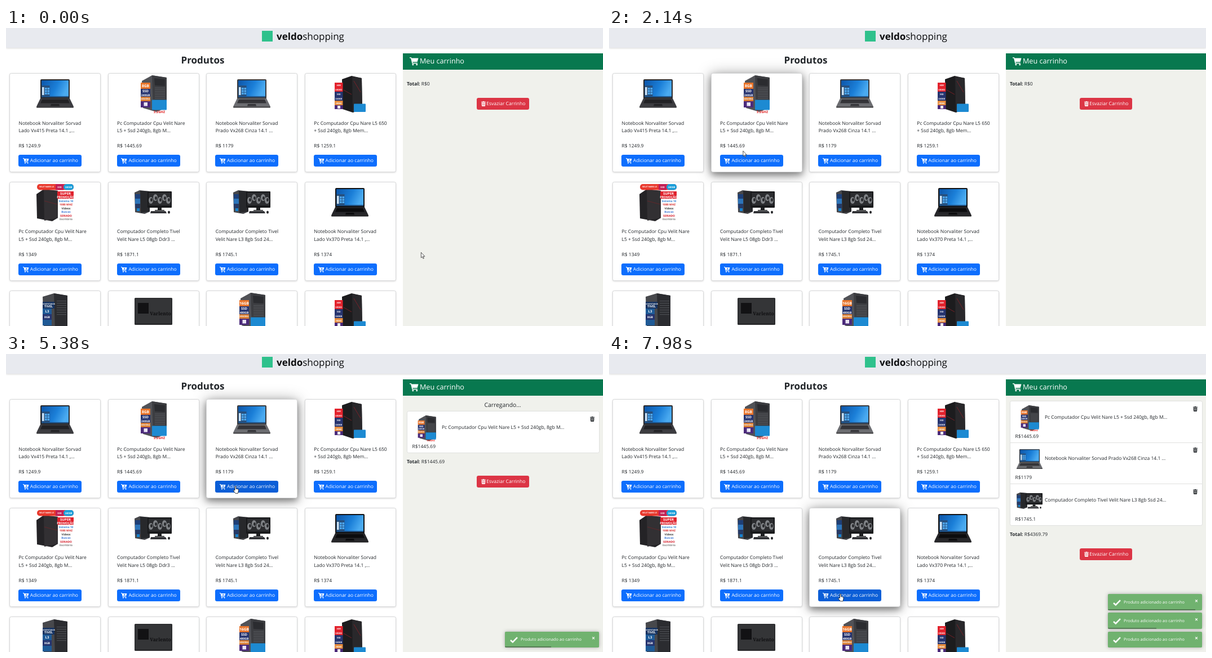
An HTML page for the animation above (8000 ms loop, 1059x529 px).

```html
<!DOCTYPE html>
<html lang="pt-BR">
<head>
<meta charset="utf-8">
<title>Loja</title>
<style>
html, body { margin: 0; width: 100%; height: 100%; overflow: hidden; background: #fff; }
#stage { position: relative; width: 1059px; height: 529px; overflow: hidden; background: #fff;
  font: 8.5px/14px "Open Sans", "Noto Sans", sans-serif; color: #212529; text-rendering: geometricPrecision; }
#stage div, #stage span, #stage svg { position: absolute; box-sizing: border-box; white-space: pre; }
#stage svg { overflow: visible; }
.top { left: 0; top: 0; width: 1059px; height: 35px; background: #e8eaef; box-shadow: 0 1px 3px rgba(0,0,0,.16); }
.card { width: 162px; height: 176px; background: #fff; border: 1px solid #d6d7d8; border-radius: 3.4px;
  box-shadow: 0 1px 3px rgba(0,0,0,.14); z-index: 1; }
.card.on { z-index: 0; box-shadow: 0 2px 26px rgba(0,0,0,.36), 0 5px 12px rgba(0,0,0,.36); }
.btn { background: #0d6efd; border-radius: 3.3px; color: #fff; }
.btn.on { background: #0b5ed7; }
.panel { left: 704px; top: 45px; width: 355px; height: 484px; background: #f0f1ec; z-index: 2; }
.head { left: 704px; top: 45px; width: 355px; height: 29px; background: #08784f; color: #fff; z-index: 2; }
.cart { left: 0; top: 0; z-index: 3; }
.item { left: 711px; width: 341.5px; height: 74.3px; background: #fff; border: 1px solid #dfe0de; }
.toast { left: 885px; width: 167px; height: 28.6px; background: #51a351; border-radius: 1.7px; color: #fff;
  box-shadow: 0 0 6.6px #999; overflow: hidden; z-index: 4; }
.bar { left: 0; bottom: 0; height: 2.2px; background: #000; opacity: .4; }
.cursor { left: 0; top: 0; z-index: 9; }
</style>
</head>
<body>
<div id="stage"></div>
<script>
const stage = document.getElementById('stage');

function add(parent, cls, css = '', html = '') {
  const el = document.createElement('div');
  el.className = cls;
  el.style.cssText = css;
  el.innerHTML = html;
  parent.append(el);
  return el;
}
// One line of text, centred vertically on y
const line = (x, y, str, css = '') => `<span style="left:${x}px;top:${y - 7}px;${css}">${str}</span>`;
const svg = (x, y, w, h, box, body) =>
  `<svg style="left:${x}px;top:${y}px" width="${w}" height="${h}" viewBox="0 0 ${box}">${body}</svg>`;
const rect = (x, y, w, h, fill, r = 0) => `<rect x="${x}" y="${y}" width="${w}" height="${h}" rx="${r}" fill="${fill}"/>`;
const poly = (points, fill) => `<polygon points="${points}" fill="${fill}"/>`;
const label = (x, y, size, fill, str, more = '') =>
  `<text x="${x}" y="${y}" font-size="${size}" font-weight="700" text-anchor="middle" fill="${fill}" ${more}>${str}</text>`;

// Icons
const cartShape = '<path d="M0 0h2.4l.5 1.3H13l-1.6 5.6H4.4l.3 1.3h6.9v1.2H3.7L1.7 1.3H0z"/><circle cx="4.9" cy="10.9" r="1.2"/><circle cx="10.7" cy="10.9" r="1.2"/>';
const cartIcon = (x, y, w, plus) => svg(x, y, w, w * 12 / 13, '13 12',
  `<g fill="#fff">${cartShape}</g>` + (plus ? '<path d="M7.8 2.2v3.8M5.9 4.1h3.8" stroke="#0d6efd" stroke-width="1"/>' : ''));
const trashIcon = (x, y, fill, gap) => svg(x, y, 8, 9, '8 9',
  `<g fill="${fill}"><path d="M0 .7h2.4L2.9 0h2.2l.5.7H8v1.1H0z"/><path d="M.6 2.4h6.8L7 8.2q-.1.8-.9.8H1.9Q1.1 9 1 8.2z"/></g>
   <path d="M2.5 3.6v4M4 3.6v4M5.5 3.6v4" stroke="${gap}" stroke-width=".6"/>`);

// Product pictures on a 66 by 66 field
function laptop(lid, base, keys) {
  const tiles = [0, 1, 2, 3, 4, 5].map(i => rect(15 + i % 2 * 4.5, 22 + (i >> 1) * 4.3, 3.6, 3.4, '#4fa9f0')).join('');
  return rect(7, 7, 52, 35, lid, 2) + rect(9, 9, 48, 29.5, 'url(#screen)') + rect(9, 18, 14.5, 19, '#27517f') + tiles +
    rect(10, 21, 3.6, 14, '#c9dff2') + rect(9, 37, 48, 1.5, '#1c4f86') +
    poly('7,41 59,41 66,55.5 0,55.5', base) + poly('10,42.8 56,42.8 59,49.5 7,49.5', keys) +
    poly('26,51 40,51 41,54.4 25,54.4', keys) + rect(0, 55.2, 66, 2.3, lid, 1);
}
function tower(mem, disk) {
  return poly('13,10 31,0 57,4 57,57 39,65 15,58', '#515257') + poly('31,0 57,4 57,57 33,62', '#3c3d41') +
    poly('35,5 54,7 54,19 36,18', '#2b2c30') +
    [22, 25, 28, 31, 34, 37, 40].map(y => rect(36, y, 18, 1, '#55575c')).join('') +
    rect(11, 13, 17, 11, '#e8742a') + label(19.5, 20.5, 6.6, '#fff', mem) + rect(11, 24, 17, 14, '#26346f') +
    label(19.5, 30, 6, '#fff', 'SSD') + label(19.5, 36.5, 5, '#fff', disk) + rect(11, 38, 17, 8, '#d97f35') +
    label(19.5, 43.4, 3.3, '#fff', 'MEMÓRIA') + rect(11, 46, 17, 11, '#4b2a7b') + rect(16.5, 48, 6.5, 6.5, '#e9e4f4') +
    rect(31, 43.5, 26, 18, '#1d8ad2', 1) + label(44, 66.5, 5.8, '#e02020', '3.2GHZ');
}
const blackTower = () => poly('19,7 36,1 54,5 55,60 38,66 20,60', '#1c1c1e') + poly('37,2 54,5 55,60 38,66', '#29282b') +
  '<path d="M22 26 36 34M40 10 52 30" stroke="#8d2028" stroke-width=".8"/>' +
  ['#e3222c', '#e3222c', '#26346f', '#26346f', '#e58b3c'].map((c, i) =>
    rect(6, 13 + i * 8, 14.5, 8, c) + label(13.2, 18.5 + i * 8, 3.8, '#fff', ['4GB', 'VIDEO', 'SSD', '240GB', 'HDMI'][i])).join('') +
  rect(6, 53, 14.5, 7, '#4b2a7b') + rect(11, 54, 5, 5, '#eee') + rect(40, 50.5, 21, 14.5, '#1d8ad2', 1);
function promoTower() {
  const rows = [['#2a7fd4', 'Sistema 10'], ['#d52a2a', '1000 MHZ'], ['#333', 'Videos'], ['#3c78d8', 'Buscas'], ['#d31420', 'SERIADO'], ['#777', 'Escritório']];
  return poly('0,18 13,9 38,12 38,60 28,66 1,61', '#242326') + poly('13,10 38,12 38,60 14,65', '#323033') +
    '<path d="M14 30 37 36" stroke="#6d2529" stroke-width=".8"/>' +
    rect(1, 0, 65, 10.5, '#e93a2e', 5) + rect(34, 0, 14, 10.5, '#c32055') + rect(48, 0, 18, 10.5, '#1c9fda', 5) +
    label(18, 6.3, 3.7, '#fff', 'VELIT NARE L5') + label(41, 6.5, 4, '#fff', 'SSD') + label(57, 6.5, 4, '#fff', '240GB') +
    rect(37, 13, 29, 13, '#e0232e') + label(51.5, 18.7, 6, '#fff', 'SUPER') + label(51.5, 25, 5.2, '#fff', 'PROMOÇÃO') +
    rows.map(([c, s], i) => label(52.5, 32 + i * 6.4, 4.8, c, s)).join('');
}
const fullSet = () => poly('0,15 9,11 27,13 27,49 18,53 1,50', '#46474b') + poly('10,12 27,13 27,49 11,51', '#27282b') +
  rect(1, 18, 9, 8, '#1e3f77') + rect(1, 26, 9, 9, '#2c74b9') + rect(1, 35, 9, 8, '#253a66') + rect(4, 43, 5, 5, '#1680cc') +
  rect(23, 13, 43, 29, '#18191b', 1) + rect(25, 15, 39, 23, '#2b2c2f') +
  [29, 37, 45, 53, 60].map((x, i) =>
    `<ellipse cx="${x}" cy="${i % 2 ? 24 : 29}" rx="4" ry="6" fill="#a4a7ab" opacity=".7"/><ellipse cx="${x + 1}" cy="${i % 2 ? 25 : 28}" rx="2" ry="3" fill="#2b2c2f"/>`).join('') +
  rect(41, 42, 7, 5, '#1f2022') + rect(36, 46, 17, 1.5, '#1f2022') + poly('29,48 55,48 57,52 28,52', '#323337') +
  '<ellipse cx="61" cy="50" rx="2" ry="2.5" fill="#25262a"/>';
const darkTower = () => poly('11,7 31,1 55,5 55,60 36,66 13,60', '#47484c') + poly('31,1 55,5 55,60 33,66', '#2b2c30') +
  [14, 18, 22, 26, 30, 34, 38].map(y => rect(36, y, 17, 1.2, '#4b4d52')).join('') +
  rect(11, 16, 21, 12, '#173462') + label(21.5, 20.5, 3.2, '#fff', 'COMPUTADOR') + label(21.5, 26.4, 5.6, '#fff', 'TIVEL') +
  rect(11, 28, 16, 10, '#1f5a96') + label(19, 35, 6, '#fff', 'L3') + rect(11, 38, 16, 10, '#26346f') +
  label(19, 45, 5, '#fff', '8GB') + rect(11, 48, 16, 10, '#1f5a96');
const disk = () => rect(0, 9, 67, 48, '#2d2e30', 1.5) + rect(2, 11, 63, 44, '#343537') + rect(6, 18, 19, 19, '#121214') +
  label(46, 40, 8.6, '#101012', 'Varlento', 'font-family="Noto Serif, serif"') +
  rect(2, 55, 63, 1, '#1d1d1f');

const art = {
  a: laptop('#29292c', '#3c3c40', '#222225'), b: tower('8GB', '240GB'), c: laptop('#3a3a3d', '#6c6d71', '#343438'),
  d: blackTower(), e: promoTower(), f: fullSet(), g: laptop('#111113', '#262629', '#0c0c0e'),
  h: darkTower(), i: disk(), j: tower('16GB', '480GB')
};
const picture = (key, x, y, size) => svg(x, y, size, size, '66 66', art[key]);

const products = [
  ['a', 'Notebook Norvaliter Sorvad', 'Lado Vx415 Preta 14.1 ,...', '1249.9'],
  ['b', 'Pc Computador Cpu Velit Nare', 'L5 + Ssd 240gb, 8gb M...', '1445.69'],
  ['c', 'Notebook Norvaliter Sorvad', 'Prado Vx268 Cinza 14.1 ...', '1179'],
  ['d', 'Pc Computador Cpu Nare L5 650', '+ Ssd 240gb, 8gb Mem...', '1259.1'],
  ['e', 'Pc Computador Cpu Velit Nare', 'L5 + Ssd 240gb, 8gb M...', '1349'],
  ['f', 'Computador Completo Tivel', 'Velit Nare L5 08gb Ddr3 ...', '1871.1'],
  ['f', 'Computador Completo Tivel', 'Velit Nare L3 8gb Ssd 24...', '1745.1'],
  ['g', 'Notebook Norvaliter Sorvad', 'Lado Vx370 Preta 14.1 ,...', '1374'],
  ['h'], ['i'], ['j'], ['d']
];
const chosen = [1, 2, 6];

stage.innerHTML = '<svg width="0" height="0"><linearGradient id="screen" x2="1" y2=".3"><stop stop-color="#0d55a8"/><stop offset=".6" stop-color="#1b7fd8"/><stop offset="1" stop-color="#4aaaf0"/></linearGradient></svg>';
add(stage, 'top', '', `<div style="left:454px;top:5px;width:19px;height:19px;background:#2fc18c"></div>` +
  line(480, 15, '<b>veldo</b>shopping', 'font-size:17px;color:#0c0d0f'));
add(stage, '', 'left:0;top:0', line(310.5, 57, 'Produtos', 'font-size:17px;font-weight:700'));

const cards = products.map(([key, first, second, price], i) => {
  const x = 6 + i % 4 * 174.6, y = 80.3 + (i >> 2) * 192.8;
  const el = add(stage, 'card', `left:${x}px;top:${y}px`, picture(key, 46.5, 2.8, 66) +
    (first ? line(15.5, 88.4, first) + line(15.5, 102, second) + line(15.5, 128.6, 'R$ ' + price) : ''));
  const btn = add(el, 'btn', 'left:15.3px;top:144px;width:112px;height:21.2px',
    cartIcon(7.5, 5.8, 10.4, true) + line(20.5, 10.8, 'Adicionar ao carrinho'));
  return { el, btn, x, y };
});

add(stage, 'panel');
add(stage, 'head', '', cartIcon(11.5, 6.5, 15.5) + line(30, 14, 'Meu carrinho', 'font-size:12.6px'));
const cart = add(stage, 'cart');
const loading = add(cart, '', 'left:704px;top:84px;width:354px;text-align:center;font-size:10.4px', 'Carregando...');
const items = chosen.map((n, i) => {
  const [key, first, second, price] = products[n];
  return add(cart, 'item', '', picture(key, 11, 6.5, 46) + line(61, 28.7, first + ' ' + second) +
    line(8.5, 62.3, 'R$' + price) + trashIcon(323.5, 8.5, '#212529', '#fff'));
});
const total = add(cart, '', 'left:711px');
const clear = add(cart, 'btn', 'left:835px;width:92.5px;height:21.2px;background:#dc3545',
  trashIcon(7.5, 6, '#fff', '#dc3545') + line(17.3, 10.8, 'Esvaziar Carrinho'));

const toasts = chosen.map(() => {
  const el = add(stage, 'toast', '', svg(8.5, 9.5, 14, 11, '14 11', '<path d="M1 6 4.8 9.4 13 1.2" fill="none" stroke="#fff" stroke-width="2.6"/>') +
    line(28, 14.8, 'Produto adicionado ao carrinho', 'font-size:7.3px') + line(154, 12.5, '×', 'font-size:10.5px;font-weight:700'));
  return { el, bar: add(el, 'bar') };
});

const cursor = add(stage, 'cursor');
const arrow = add(cursor, '', '', svg(0, 0, 7, 12, '7 12', '<path d="M.4.4V9.9L2.5 8 4 11.4 5.4 10.8 4 7.4H6.9z" fill="#fff" stroke="#111" stroke-width=".7"/>'));
const hand = add(cursor, '', '', svg(-3.5, -.5, 10, 14, '10 14', '<path d="M3 8V1.4a1 1 0 0 1 2 0V5.2l3.3.6q1.5.4 1.3 2L9 11 8.4 13.4H4L.6 9Q.3 7.4 2 7.6z" fill="#fff" stroke="#111" stroke-width=".8"/>'));

// Time, x, y of the pointer
const path = [
  [0, 736, 398], [60, 733, 396], [350, 580, 308], [680, 450, 234], [860, 450, 234], [870, 451, 234], [1000, 451, 234],
  [1250, 390, 222], [1410, 225, 195], [1480, 153, 179.5], [1650, 112, 186], [1880, 120, 192],
  [2100, 220, 215], [2280, 296.5, 227], [2950, 296.5, 227], [3200, 345, 235], [3410, 394, 237], [3620, 406, 234],
  [5900, 406, 234], [6150, 409, 270], [6460, 413, 350.5], [6740, 411, 408], [7000, 409.5, 425.5], [8000, 409.5, 425.5]
];
const waits = [[2610, 2810], [5120, 5530], [7180, 7600]];
const toastStarts = [2830, 5550, 7620];

function pointer(t) {
  const i = Math.max(1, path.findIndex(p => p[0] >= t));
  const [t0, x0, y0] = path[i - 1], [t1, x1, y1] = path[i];
  const k = Math.min(1, Math.max(0, (t - t0) / (t1 - t0)));
  return [x0 + (x1 - x0) * k, y0 + (y1 - y0) * k];
}
const inside = (x, y, l, t, w, h) => x >= l && x <= l + w && y >= t && y <= t + h;

function render(t) {
  const [x, y] = pointer(t);
  const [hx, hy] = pointer(Math.max(0, t - 70)); // hover follows slightly late
  let pressing = false;
  for (const c of cards) {
    const over = inside(hx, hy, c.x, c.y, 162, 176);
    const overBtn = inside(hx, hy, c.x + 16.3, c.y + 145, 112, 21.2);
    c.el.classList.toggle('on', over);
    c.btn.classList.toggle('on', overBtn);
    pressing = pressing || overBtn;
  }
  cursor.style.transform = `translate(${x}px,${y}px)`;
  hand.style.display = pressing ? '' : 'none';
  arrow.style.display = pressing ? 'none' : '';

  const count = waits.filter(w => t >= w[1]).length;
  const busy = waits.some(w => t >= w[0] && t < w[1]);
  const shift = busy ? 18 : 0;
  loading.style.display = busy ? '' : 'none';
  items.forEach((el, i) => {
    el.style.display = i < count ? '' : 'none';
    el.style.top = 83.3 + 73.5 * i + shift + 'px';
    el.style.borderRadius = (i ? '0 0 ' : '3.3px 3.3px ') + (i === count - 1 ? '3.3px 3.3px' : '0 0');
  });
  const sum = chosen.slice(0, count).reduce((s, n) => s + Number(products[n][3]), 0);
  total.innerHTML = `<b>Total:</b> R$${Number(sum.toFixed(2))}`;
  total.style.top = 93.2 + 73.6 * count + shift + 'px';
  clear.style.top = 124.3 + 73.6 * count + shift + 'px';

  toasts.forEach(({ el, bar }, i) => {
    const age = t - toastStarts[i];
    const k = Math.min(1, Math.max(0, age / 300));
    el.style.display = age >= 0 ? '' : 'none';
    el.style.opacity = .8 * (.5 - Math.cos(k * Math.PI) / 2);
    el.style.top = 492.5 - 33.1 * i + 'px';
    bar.style.width = Math.max(0, 100 - age / 50) + '%';
  });
}

const start = performance.now();
function tick() {
  render((performance.now() - start) % 8000);
  requestAnimationFrame(tick);
}
tick();
</script>
</body>
</html>
```
